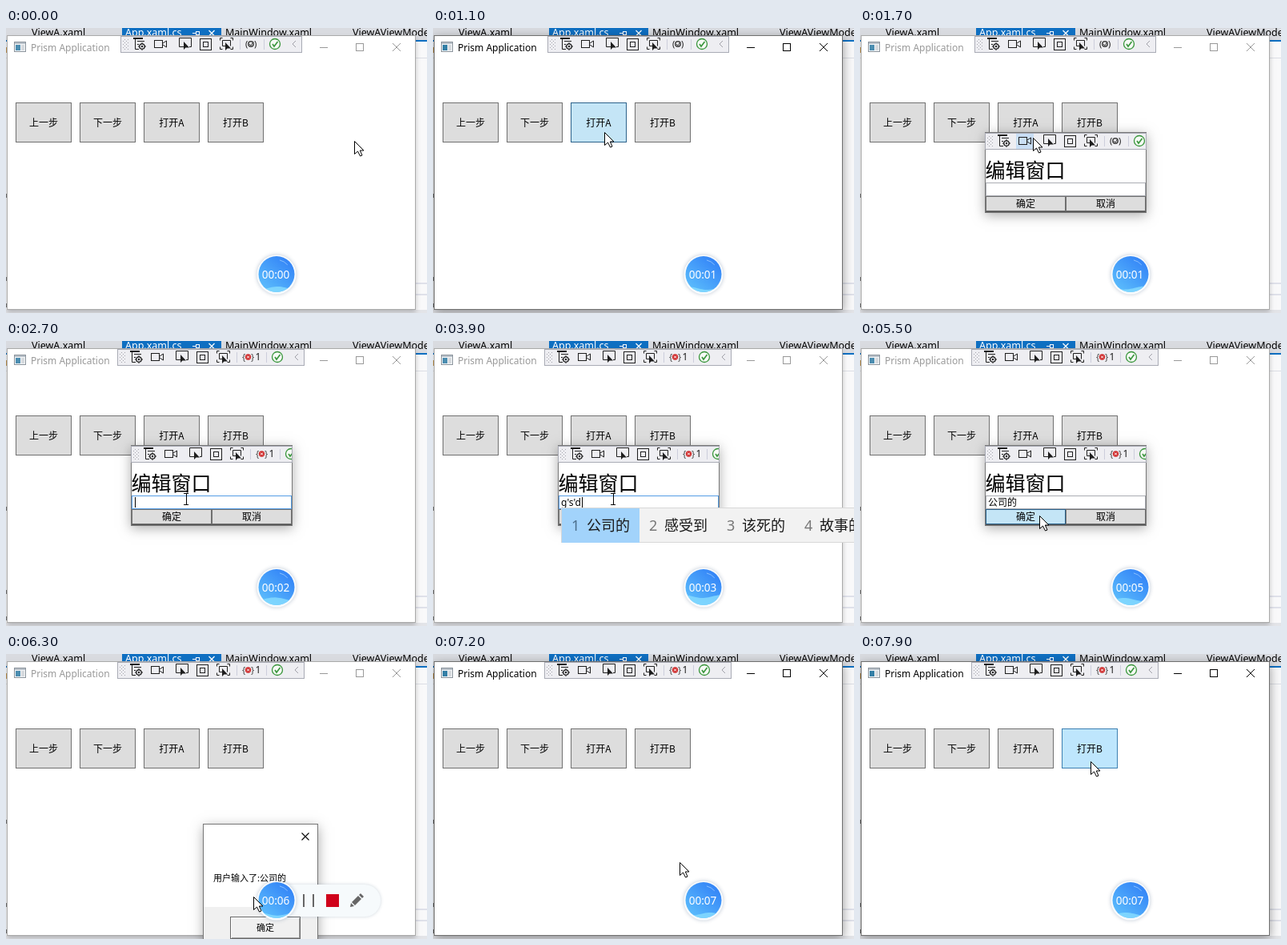
These frames come from a looping animation (526 by 356 pixels, 8 s). An HTML page with a canvas:

```html
<!DOCTYPE html>
<html lang="zh">
<head>
<meta charset="utf-8">
<style>
html, body { margin: 0; width: 100%; height: 100%; overflow: hidden; background: #fff; }
canvas { display: block; }
</style>
</head>
<body>
<canvas id="stage" width="526" height="356"></canvas>
<script>
const ctx = document.getElementById('stage').getContext('2d');
const LOOP = 8000, STEP = 100;
const FONT = '"Noto Sans", "Noto Sans CJK SC", "Noto Sans CJK", sans-serif';
const CJK = '"Noto Sans CJK SC", "Noto Sans CJK", sans-serif';
const INK = '#1e1e1e';

// time, x, y of the pointer tip
const PATH = [
  [0, 436, 141], [100, 435, 141], [900, 215, 130], [1400, 215, 130],
  [1700, 217, 137], [1900, 217, 137], [2500, 226, 197], [4600, 226, 197],
  [5200, 225, 218], [5600, 225, 218], [6300, 310, 303], [6600, 322, 341],
  [6900, 322, 341], [7600, 289, 134], [8000, 289, 134]
];

const between = (t, a, b) => t >= a && t < b;
const inside = (p, x, y, w, h) => p.x >= x && p.x < x + w && p.y >= y && p.y < y + h;

function pointer(t) {
  const i = PATH.findIndex((k, n) => n && t < k[0]);
  const [t0, x0, y0] = PATH[i - 1], [t1, x1, y1] = PATH[i];
  const u = (t - t0) / (t1 - t0), e = u * u * (3 - 2 * u);
  return { x: Math.round(x0 + (x1 - x0) * e), y: Math.round(y0 + (y1 - y0) * e) };
}

function fill(x, y, w, h, color) {
  ctx.fillStyle = color;
  ctx.fillRect(x, y, w, h);
}

function frame(x, y, w, h, color) {
  ctx.strokeStyle = color;
  ctx.lineWidth = 1;
  ctx.strokeRect(x + .5, y + .5, w - 1, h - 1);
}

function text(str, x, y, size, color = '#000', align = 'left', font = FONT) {
  ctx.font = `${size}px ${font}`;
  ctx.textAlign = align;
  ctx.fillStyle = color;
  ctx.fillText(str, x, y);
}

function line(points, color, width = 1) {
  ctx.strokeStyle = color;
  ctx.lineWidth = width;
  ctx.beginPath();
  points.forEach(([x, y]) => ctx.lineTo(x, y));
  ctx.stroke();
}

function shape(points, color) {
  ctx.fillStyle = color;
  ctx.beginPath();
  points.forEach(([x, y]) => ctx.lineTo(x, y));
  ctx.closePath();
  ctx.fill();
}

function disc(x, y, r, color) {
  ctx.fillStyle = color;
  ctx.beginPath();
  ctx.arc(x, y, r, 0, 7);
  ctx.fill();
}

function ring(x, y, r, color, width = 1) {
  ctx.strokeStyle = color;
  ctx.lineWidth = width;
  ctx.beginPath();
  ctx.arc(x, y, r, 0, 7);
  ctx.stroke();
}

function cross(x, y, r, color, width = 1) {
  line([[x - r, y - r], [x + r, y + r]], color, width);
  line([[x + r, y - r], [x - r, y + r]], color, width);
}

function shadowed(x, y, w, h, blur, alpha, color) {
  ctx.save();
  ctx.shadowColor = `rgba(0,0,0,${alpha})`;
  ctx.shadowBlur = blur;
  ctx.shadowOffsetY = 3;
  fill(x, y, w, h, color);
  ctx.restore();
}

function button(label, x, y, w, h, state) {
  const [bg, edge] = {
    normal: ['#dddddd', '#707070'],
    hover: ['#bee6fd', '#3c7fb1'],
    pressed: ['#c4e5f6', '#2c628b']
  }[state];
  fill(x, y, w, h, bg);
  frame(x, y, w, h, edge);
  text(label, x + w / 2, y + h / 2 + 4.5, 12, '#000', 'center', CJK);
}

function miniArrow(x, y) {
  shape([[x, y], [x, y + 10], [x + 2.5, y + 7.5], [x + 7, y + 7.5]], INK);
}

function corners(x, y, rx, ry) {
  for (const sx of [-1, 1]) for (const sy of [-1, 1])
    line([[x + sx * (rx - 3), y + sy * ry], [x + sx * rx, y + sy * ry], [x + sx * rx, y + sy * (ry - 3)]], INK);
}

function debugBar(x, y, w, failed, chevron, camHover) {
  const c = y + 10;
  ctx.save();
  ctx.beginPath();
  ctx.rect(x, y, w, 21);
  ctx.clip();
  fill(x, y, w, 21, '#eeeef2');
  for (let i = 0; i < 7; i++)
    for (let j = 0; j < 2; j++) fill(x + 5 + j * 4 - (i % 2) * 2, y + 4 + i * 2, 1, 1, '#a4a4ac');
  if (camHover) fill(x + 39, y + 1, 22, 19, '#c9def5');

  // live tree
  const a = x + 23;
  fill(a - 7, c - 8, 12, 2, INK);
  line([[a - 4.5, c - 6], [a - 4.5, c + 6.5], [a, c + 6.5]], INK);
  line([[a - 2, c - 3.5], [a + 7, c - 3.5]], INK);
  line([[a - 2, c + .5], [a, c + .5]], INK);
  line([[a + 4, c - 2], [a + 4, c + 8]], INK);
  line([[a - 1, c + 3], [a + 9, c + 3]], INK);
  disc(a + 4, c + 3, 3, '#eeeef2');
  ring(a + 4, c + 3, 3.2, INK, 1.3);
  disc(a + 4, c + 3, 1.2, INK);

  // camera
  const b = x + 50;
  frame(b - 8, c - 5, 11, 10, INK);
  line([[b + 3, c - 1], [b + 7.5, c - 4], [b + 7.5, c + 4], [b + 3, c + 1]], INK);

  // element picker
  const d = x + 81;
  line([[d - 2, c + 3.5], [d - 7.5, c + 3.5], [d - 7.5, c - 7.5], [d + 7.5, c - 7.5], [d + 7.5, c + 3.5], [d + 5, c + 3.5]], INK);
  miniArrow(d - 2, c - 3);

  // layout adorners
  const e = x + 107;
  frame(e - 8, c - 7, 15, 15, INK);
  frame(e - 4, c - 3, 7, 7, INK);

  // focus tracker
  const g = x + 133;
  corners(g - .5, c - .5, 8, 7);
  line([[g - 2, c + 2.5], [g - 5.5, c + 2.5], [g - 5.5, c - 4.5], [g + 4.5, c - 4.5], [g + 4.5, c + 2.5]], INK);
  miniArrow(g - 2, c - 2);

  const sep = failed ? 186 : 179;
  fill(x + 149, y + 4, 1, 13, '#cccedb');
  fill(x + sep, y + 4, 1, 13, '#cccedb');
  if (failed) {
    text('{', x + 156, c + 4, 11, '#444');
    text('}', x + 167, c + 4, 11, '#444');
    disc(x + 163.5, c, 3.7, '#d03030');
    cross(x + 163.5, c, 1.5, '#fff');
    text('1', x + 172.5, c + 4, 12, INK);
  } else {
    text('(', x + 156, c + 4, 11, INK);
    text(')', x + 167, c + 4, 11, INK);
    ring(x + 163, c, 3.2, '#444', 1.5);
    line([[x + 161, c], [x + 163, c + 2], [x + 166, c - 3]], '#444');
  }
  const k = x + (failed ? 200 : 193);
  disc(k, c, 7, '#f6faf5');
  ring(k, c, 6.5, '#38953b', 1.3);
  line([[k - 3, c], [k - 1, c + 3], [k + 3.5, c - 3]], '#38953b', 1.6);
  if (chevron) line([[k + 26, c - 4], [k + 22, c], [k + 26, c + 4]], '#a0a0a8');
  ctx.restore();
  frame(x, y, w, 21, '#a9abb5');
}

function editor() {
  fill(0, 0, 526, 356, '#f9f9fa');
  fill(0, 0, 526, 16, '#d9dbe0');
  fill(145, 0, 124, 10, '#0e6fc2');
  text('ViewA.xaml', 32, 10, 12.5);
  text('App.xaml.cs', 149, 10, 12.5, '#fff');
  text('MainWindow.xaml', 274, 10, 12.5);
  text('ViewAViewModel.cs', 433, 10, 12.5);
  line([[233, 6.5], [237, 6.5]], '#fff');
  frame(237, 4, 5, 5, '#fff');
  cross(257, 6.5, 3.5, '#fff', 1.3);
  fill(0, 15, 526, 2, '#0e6fc2');
  fill(0, 37, 526, 1, '#dcdee4');
  fill(512, 318, 14, 2, '#dfe1ea');
  fill(512, 332, 14, 2, '#dfe1ea');
  fill(0, 352, 526, 4, '#e3e4e8');
  for (const y of [207, 311, 344]) fill(0, y, 1, 5, '#777');
  fill(0, 24, 1, 7, '#c79b58');
}

function mainWindow(t, p, active, popup, failed) {
  shadowed(1, 10, 511, 342, active ? 12 : 6, active ? .4 : .22, '#fff');
  fill(1, 10, 511, 342, '#fff');
  frame(1, 9, 511, 343, active ? '#707070' : '#aaaaaa');
  const ink = active ? '#000' : '#999999';
  fill(10, 17, 15, 13, '#f4f6f8');
  frame(10, 17, 15, 13, '#8b949c');
  fill(11, 18, 13, 2, '#b8c0c8');
  fill(12, 21, 6, 7, active ? '#347fa6' : '#4b8db0');
  fill(19, 21, 4, 7, '#d6dade');
  text('Prism Application', 31, 28.5, 12, ink);
  line([[392, 24.5], [402, 24.5]], ink);
  frame(437, 19, 10, 10, ink);
  cross(488, 24, 5, ink);

  ['上一步', '下一步', '打开A', '打开B'].forEach((label, i) => {
    const x = 12 + i * 80;
    const over = !popup && inside(p, x, 93, 70, 50);
    const down = i === 2 && between(t, 1000, 1400);
    button(label, x, 93, 70, 50, down ? 'pressed' : over ? 'hover' : 'normal');
  });
  if (failed) debugBar(139, 10, 234, true, true);
  else debugBar(143, 10, 227, false, true);
}

function dialog(t, p, failed) {
  shadowed(156, 130, 202, 101, 14, .32, '#fff');
  frame(156, 130, 202, 101, '#777');
  debugBar(156, 131, 202, failed, false, inside(p, 195, 131, 23, 20));
  text('编辑窗口', 156.5, 187, 25, '#000', 'left', CJK);
  const focused = between(t, 2600, 5400);
  frame(157, 193, 200, 17, focused ? '#569de5' : '#abadb3');
  const typed = t < 3600 ? '' : t < 3700 ? 'g' : t < 3900 ? "g's" : t < 4500 ? "g's'd" : '公司的';
  text(typed, 160, 206, 12);
  if (focused && (between(t, 3600, 4600) || (t - 2600) % 1060 < 530))
    fill(161 + Math.round(ctx.measureText(typed).width), 195, 1, 13, '#000');
  const over = inside(p, 157, 210, 100, 19);
  button('确定', 157, 210, 100, 19, t >= 5400 ? 'pressed' : over ? 'hover' : 'normal');
  button('取消', 257, 210, 100, 19, 'normal');
  fill(157, 229, 200, 1, '#555');
}

function candidates() {
  fill(160, 208, 376, 44, '#f2f2f2');
  frame(160, 208, 376, 44, '#d8d8d8');
  fill(161, 209, 97, 43, '#a2d3fb');
  ['公司的', '感受到', '该死的', '故事的'].forEach((word, i) => {
    text(i + 1, 173 + i * 97, 237, 18, i ? '#777' : '#4c6f8c');
    text(word, 192 + i * 97, 237, 18, '#1a1a1a', 'left', CJK);
  });
}

function messageBox() {
  shadowed(247, 213, 143, 160, 14, .35, '#fff');
  fill(247, 316, 143, 40, '#f0f0f0');
  frame(246, 212, 144, 160, '#777');
  cross(374, 228, 4.5, '#000', 1.1);
  text('用户输入了:公司的', 259, 284, 11, '#000', 'left', CJK);
  fill(280, 328, 88, 28, '#696969');
  fill(281, 329, 86, 26, '#fff');
  fill(282, 330, 85, 25, '#a0a0a0');
  fill(282, 330, 84, 24, '#f0f0f0');
  text('确定', 324, 345.5, 11, '#000', 'center', CJK);
}

function recorder(t, open) {
  if (open) {
    ctx.save();
    ctx.shadowColor = 'rgba(60,90,120,.25)';
    ctx.shadowBlur = 4;
    ctx.fillStyle = '#f6fafc';
    ctx.beginPath();
    ctx.roundRect(318, 288, 150, 40, 20);
    ctx.fill();
    ctx.restore();
    fill(371, 300, 2, 16, '#666');
    fill(383, 300, 2, 16, '#666');
    fill(400, 300, 16, 16, '#d0021b');
    shape([[430, 316], [431, 311], [435, 315]], '#666');
    shape([[432, 310], [440, 302], [444, 306], [436, 314]], '#666');
    shape([[441, 301], [443, 299], [447, 303], [445, 305]], '#666');
  }
  ctx.save();
  ctx.shadowColor = 'rgba(40,70,110,.3)';
  ctx.shadowBlur = 5;
  disc(338, 308, 24.5, '#f8fbfd');
  ctx.restore();

  const blue = ctx.createLinearGradient(352, 290, 322, 326);
  blue.addColorStop(0, '#3485f7');
  blue.addColorStop(1, '#5bbcfc');
  disc(338, 307.5, 22.5, blue);

  ctx.save();
  ctx.beginPath();
  ctx.arc(338, 307.5, 22.5, 0, 7);
  ctx.clip();
  const level = 325 - 6 * Math.sin(Math.PI * t / LOOP) ** 6;
  ctx.beginPath();
  ctx.moveTo(314, 334);
  for (let x = 314; x <= 362; x += 2)
    ctx.lineTo(x, level + 2 * Math.sin(x / 8 + t / 400));
  ctx.lineTo(362, 334);
  ctx.fillStyle = 'rgba(135,222,255,.8)';
  ctx.fill();
  ctx.restore();
  ctx.strokeStyle = 'rgba(190,225,255,.6)';
  ctx.lineWidth = 1;
  ctx.beginPath();
  ctx.arc(338, 307.5, 18, -1.35, -.7);
  ctx.stroke();

  const sec = Math.min(7, Math.max(0, Math.floor((t - 100) / 1000)));
  text('00:0' + sec, 337, 312.5, 13.6, '#fff', 'center');
}

function drawPointer({ x, y }, beam) {
  if (beam) {
    line([[x - 4, y - 6.5], [x + 2, y - 6.5]], '#000');
    line([[x - 4, y + 7.5], [x + 2, y + 7.5]], '#000');
    line([[x - .5, y - 6], [x - .5, y + 7]], '#000');
    return;
  }
  const arrow = [[0, 0], [0, 16], [4, 12.5], [7, 18.5], [9.5, 17.5], [6.8, 11.5], [11.5, 11.5], [0, 0]]
    .map(([dx, dy]) => [x + dx - .5, y + dy + .5]);
  shape(arrow, '#fff');
  line(arrow, '#000');
}

function draw(t) {
  const p = pointer(t);
  const editing = between(t, 1400, 5700);
  const message = between(t, 5800, 6800);
  const active = between(t, 1000, 1400) || between(t, 5700, 5800) || t >= 6900;
  const failed = t >= 2100;
  editor();
  mainWindow(t, p, active, editing || message, failed);
  if (editing) dialog(t, p, failed);
  if (message) messageBox();
  if (between(t, 3600, 4500)) candidates();
  recorder(t, between(t, 6200, 6700));
  drawPointer(p, editing && inside(p, 157, 193, 200, 17));
}

function tick(now) {
  draw(Math.floor((now % LOOP) / STEP) * STEP);
  requestAnimationFrame(tick);
}
requestAnimationFrame(tick);
</script>
</body>
</html>
```
